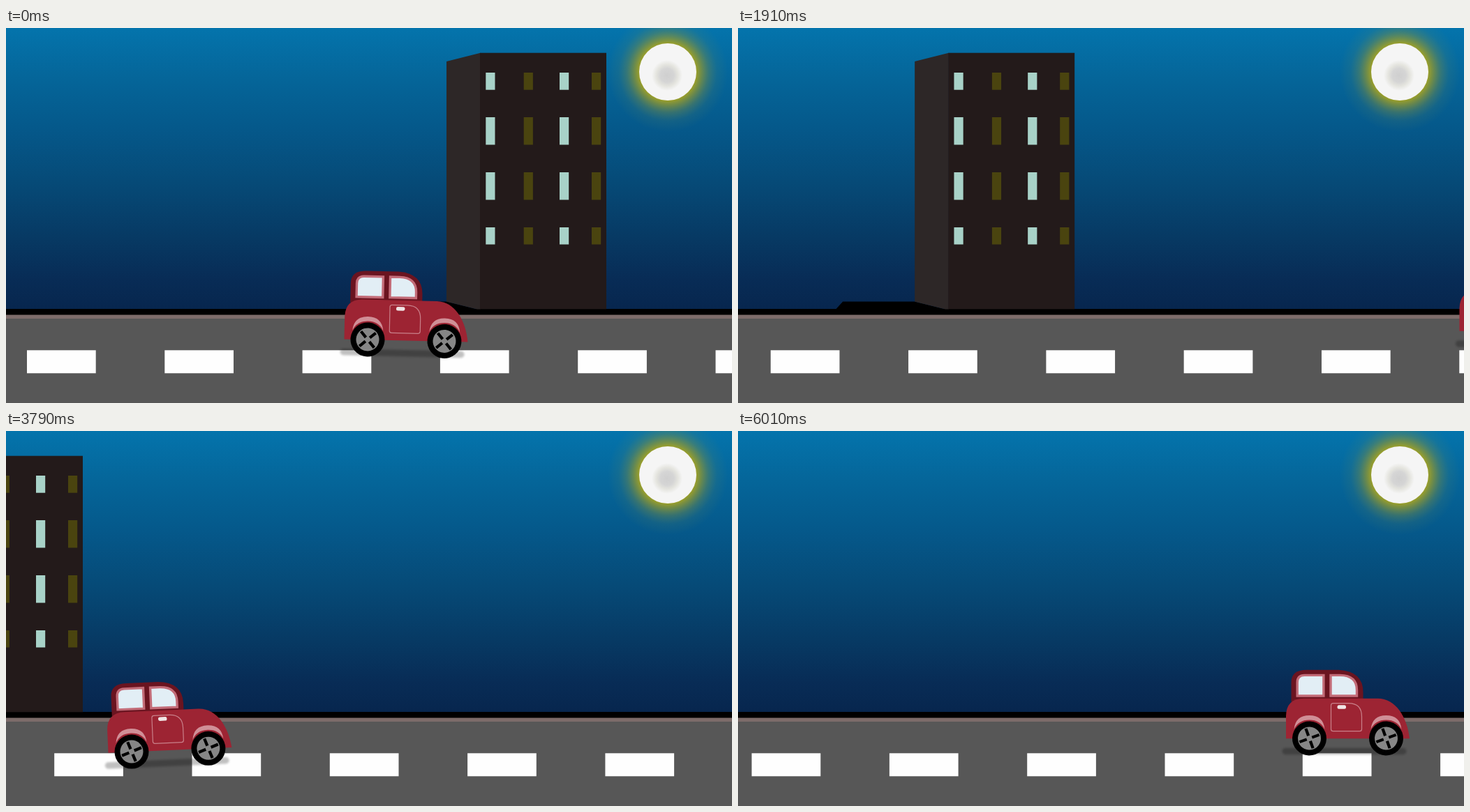
Write an HTML page that moves like this. It is 1040 px wide and 538 px high and loops after 6110 ms.

```html
<!DOCTYPE html>
<html lang="en">
<head>
<meta charset="utf-8">
<title>Night drive</title>
<style>
html, body { margin: 0; width: 100%; height: 100%; overflow: hidden; background: #575757; }
svg { display: block; width: 100vw; height: 100vh; }
</style>
</head>
<body>
<svg viewBox="0 0 1040 538" preserveAspectRatio="none">
  <defs>
    <linearGradient id="sky" x1="0" y1="0" x2="0" y2="1">
      <stop offset="0" stop-color="#0474ac"/>
      <stop offset=".17" stop-color="#05669a"/>
      <stop offset=".36" stop-color="#05588a"/>
      <stop offset=".55" stop-color="#064a77"/>
      <stop offset=".75" stop-color="#073963"/>
      <stop offset=".89" stop-color="#082c56"/>
      <stop offset="1" stop-color="#07264e"/>
    </linearGradient>
    <radialGradient id="glow" gradientUnits="userSpaceOnUse" cx="948" cy="63" r="86">
      <stop offset=".47" stop-color="#a5a322" stop-opacity=".95"/>
      <stop offset=".57" stop-color="#96992c" stop-opacity=".68"/>
      <stop offset=".68" stop-color="#7f9040" stop-opacity=".4"/>
      <stop offset=".82" stop-color="#6a8a58" stop-opacity=".14"/>
      <stop offset="1" stop-color="#6a8a58" stop-opacity="0"/>
    </radialGradient>
    <radialGradient id="spot">
      <stop offset="0" stop-color="#cfcfcf"/>
      <stop offset=".45" stop-color="#d5d5d5"/>
      <stop offset=".7" stop-color="#e4e4de"/>
      <stop offset="1" stop-color="#f5f5f5"/>
    </radialGradient>
    <filter id="soft" x="-10%" y="-100%" width="120%" height="300%">
      <feGaussianBlur stdDeviation="1.5"/>
    </filter>
    <g id="wheel">
      <circle r="24.5"/>
      <circle r="16.5" fill="#868686"/>
      <path d="M0-15V-4M0 15V4M-15 0H-4M15 0H4" stroke="#000" stroke-width="4.2"/>
    </g>
    <path id="fender" d="M-22-13Q-20-33 0-33Q20-33 22-13Q16-26.5 0-26.5Q-16-26.5-22-13Z" fill="#d08f97"/>
  </defs>

  <rect width="1040" height="404" fill="url(#sky)"/>
  <circle cx="948" cy="63" r="86" fill="url(#glow)"/>
  <circle cx="948" cy="63" r="41" fill="#f5f5f5"/>
  <circle cx="947" cy="68" r="22" fill="url(#spot)"/>

  <rect y="403" width="1040" height="9"/>
  <g id="tower">
    <path d="M-161 403.5L-151 392.5H-48L-4 403.5Z"/>
    <path d="M-48 48L0.5 35.7V403.5H-4L-48 392.5Z" fill="#2d2727"/>
    <rect y="35.7" width="181" height="367.6" fill="#231a1a"/>
  </g>
  <rect y="411.5" width="1040" height="6" fill="#7d6c6a"/>
  <rect y="417" width="1040" height="121" fill="#575757"/>
  <g id="dashes" fill="#fefefe"></g>

  <g id="car">
    <g transform="translate(-749 -399.3)">
      <rect x="655" y="458" width="178" height="9.5" rx="4.7" opacity=".24" filter="url(#soft)"/>
      <path d="M668 392V364Q668 346 690 346H736Q771 348 771 378V392Z" fill="#6a1420"/>
      <path d="M660.5 444.5V412Q661 387 686 387H792C818 387 834 414 837.5 444.5Z" fill="#9d2433"/>
      <g fill="#e2eef5" stroke="#c36c78" stroke-width="3.4">
        <path d="M676.7 383.3V364Q676.7 353.7 687 353.7H714.4V383.3Z"/>
        <path d="M724.5 383.3V353.7H738Q762 354 762 375V383.3Z"/>
      </g>
      <path d="M728 394H750Q769 394 769 413V431Q769 434 766 434H728Q725 434 725 431V397Q725 394 728 394Z" fill="none" stroke="#c9808a" stroke-width="1.2"/>
      <rect x="734" y="396.5" width="12.5" height="5.5" rx="2.5" fill="#f1e6e6"/>
      <g transform="translate(694 444.3)"><use href="#fender"/><use class="spin" href="#wheel"/></g>
      <g transform="translate(804 444.3)"><use href="#fender"/><use class="spin" href="#wheel"/></g>
    </g>
  </g>
</svg>
<script>
const LOOP = 6110, GAP = 197.3;
const $ = id => document.getElementById(id);
const tower = $('tower'), dashes = $('dashes'), car = $('car');
const wheels = document.querySelectorAll('.spin');

// The picture is held between these moments.
const steps = [0, 240, 600, 920, 1250, 1580, 1910, 2210, 2540, 2840, 3160,
  3460, 3790, 4120, 4410, 4740, 5060, 5300, 5530, 5770, 6010];

// Tracks of [time, value], linear in between.
const scroll = [[0, 0], [600, 118.5], [1250, 246.7], [2540, 503], [3790, 750], [4740, 941], [6010, 1194.2]];
const carX = [[0, 574], [600, 749], [1250, 934], [2500, 1290], [2501, -141], [3790, 233], [4740, 514], [6010, 873.5]];
const carY = [[0, 403.2], [600, 399.3], [1250, 394.5], [2500, 385], [2501, 422.4], [3790, 412.7], [4740, 405.1], [6010, 396]];
const tilt = [[0, 1.3], [100, 0], [2500, 0], [2501, 38], [3870, -5], [4676, 5], [5055, 0]];
const spin = [[0, 50], [600, 270], [1250, 490], [3790, 1420], [4740, 1740], [6010, 2230]];

function at(track, t) {
  const i = track.findIndex(p => p[0] > t);
  if (i < 0) return track[track.length - 1][1];
  const [t0, a] = track[i - 1], [t1, b] = track[i];
  return a + (b - a) * (t - t0) / (t1 - t0);
}

function addRect(parent, x, y, width, height, fill) {
  const r = document.createElementNS(parent.namespaceURI, 'rect');
  const attrs = { x, y, width, height };
  if (fill) attrs.fill = fill;
  for (const k in attrs) r.setAttribute(k, attrs[k]);
  parent.append(r);
}

for (const [y, h] of [[64, 24.7], [128, 39.5], [207, 39.5], [286, 24.5]])
  [8.3, 62.7, 114, 160].forEach((x, i) =>
    addRect(tower, x, y, 13.2, h, i % 2 ? '#4a440f' : '#a8d2c8'));
for (let i = 0; i < 7; i++) addRect(dashes, i * GAP, 462.3, 98.7, 33);

function draw(now) {
  const clock = now % LOOP;
  const t = steps.filter(s => s <= clock).pop();
  const s = at(scroll, t);
  tower.setAttribute('transform', `translate(${679 - s} 0)`);
  const first = (((30 - s) % GAP) + GAP) % GAP - GAP;
  dashes.setAttribute('transform', `translate(${first} 0)`);
  car.setAttribute('transform', `translate(${at(carX, t)} ${at(carY, t)}) rotate(${at(tilt, t)})`);
  wheels.forEach(w => w.setAttribute('transform', `rotate(${at(spin, t)})`));
}

const start = performance.now();
function tick() {
  draw(performance.now() - start);
  requestAnimationFrame(tick);
}
tick();
</script>
</body>
</html>
```
